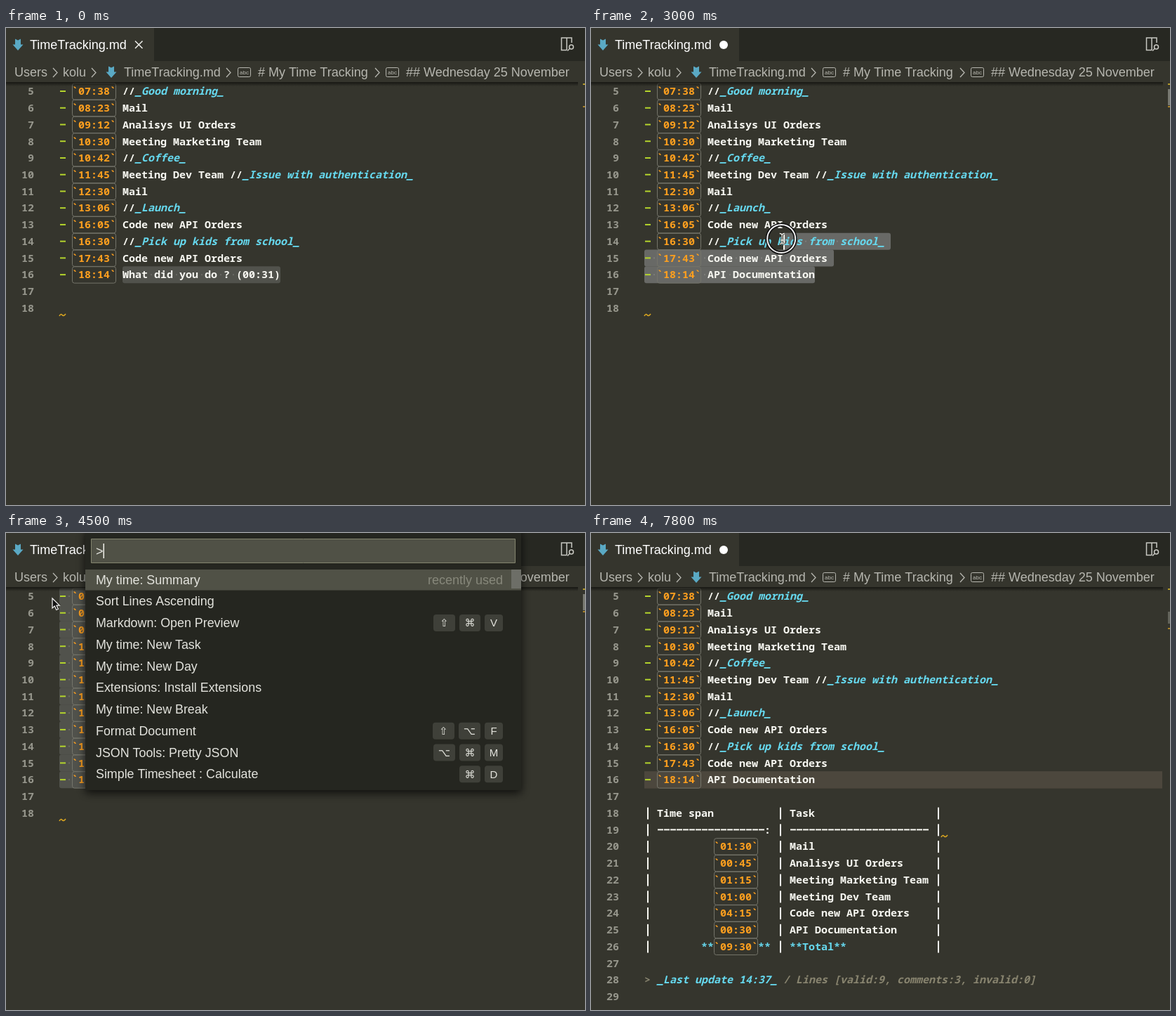
These frames come from a looping animation (825 px wide and 679 px high, 8 s). An HTML page with a canvas:

```html
<!DOCTYPE html>
<html lang="en">
<head>
<meta charset="utf-8">
<title>Time tracking</title>
<style>
  html, body { margin: 0; height: 100%; overflow: hidden; background: #35352d; }
  canvas { display: block; }
</style>
</head>
<body>
<canvas id="stage" width="825" height="679"></canvas>
<script>
const ctx = document.getElementById('stage').getContext('2d');
const LOOP = 8000, LEFT = 76, CHAR = 9, ROW = 23.74, FIRST = 5, LAST = 16;
const PASTE = 1400, MOUSE_IN = 2100, PRESS = 3000, RELEASE = 3700, PALETTE = 4500, DONE = 6300;
const BLINK_STARTS = [200, PASTE, PRESS, 3400, PALETTE, DONE];
const MOUSE = [[2100, 470, 300], [2500, 363, 345], [2900, 322, 351], [3400, 73, 96], [3500, 69, 95], [3700, 66, 93]];
const WHITE = '#f8f8f2', ORANGE = '#fd9f1f', CYAN = '#66d9ef', GREEN = '#b4d42c', GREY = '#88846f';
const UI = '"Liberation Sans", Arial, sans-serif';
const MONO = '"Noto Sans Mono", "Liberation Mono", monospace';

const ENTRIES = [
  ['07:38', '', 'Good morning'],
  ['08:23', 'Mail'],
  ['09:12', 'Analisys UI Orders'],
  ['10:30', 'Meeting Marketing Team'],
  ['10:42', '', 'Coffee'],
  ['11:45', 'Meeting Dev Team ', 'Issue with authentication'],
  ['12:30', 'Mail'],
  ['13:06', '', 'Launch'],
  ['16:05', 'Code new API Orders'],
  ['16:30', '', 'Pick up kids from school'],
  ['17:43', 'Code new API Orders'],
];
const TOTALS = [
  ['01:30', 'Mail'], ['00:45', 'Analisys UI Orders'], ['01:15', 'Meeting Marketing Team'],
  ['01:00', 'Meeting Dev Team'], ['04:15', 'Code new API Orders'], ['00:30', 'API Documentation'],
  ['09:30', '**Total**'],
];
const COMMANDS = [
  ['My time: Summary', ''], ['Sort Lines Ascending', ''], ['Markdown: Open Preview', '⇧⌘V'],
  ['My time: New Task', ''], ['My time: New Day', ''], ['Extensions: Install Extensions', ''],
  ['My time: New Break', ''], ['Format Document', '⇧⌥F'],
  ['JSON Tools: Pretty JSON', '⌥⌘M'], ['Simple Timesheet : Calculate', '⌘D'],
];

const rowY = row => 90 + (row - FIRST) * ROW;
const colX = col => LEFT + col * CHAR;

function rect(x, y, w, h, color) {
  ctx.fillStyle = color;
  ctx.fillRect(x, y, w, h);
}

function round(x, y, w, h, r, fill, stroke) {
  ctx.beginPath();
  ctx.roundRect(x, y, w, h, r);
  if (fill) { ctx.fillStyle = fill; ctx.fill(); }
  if (stroke) { ctx.strokeStyle = stroke; ctx.lineWidth = 1; ctx.stroke(); }
}

function line(d, color, width = 1.4) {
  ctx.strokeStyle = color;
  ctx.lineWidth = width;
  ctx.stroke(new Path2D(d));
}

function label(text, x, y, color, size = 18, align = 'left', family = UI) {
  ctx.font = `${size}px ${family}`;
  ctx.textAlign = align;
  ctx.fillStyle = color;
  ctx.fillText(text, x, y);
}

// Monospaced text on the editor grid
function code(text, col, row, color, style = '') {
  const y = rowY(row);
  ctx.font = `${style} bold 15px ${MONO}`;
  ctx.textAlign = 'center';
  ctx.fillStyle = color;
  [...text].forEach((ch, i) => {
    const x = colX(col + i);
    if (ch === '-') ctx.fillRect(x + 1, y - 1, 8, 2);
    else if (ch === '|') ctx.fillRect(x + 4, y - 8, 2, 17);
    else ctx.fillText(ch, x + CHAR / 2, y + 5.3);
  });
}

function timeBox(time, col, row) {
  round(colX(col) + 0.5, rowY(row) - 11.4, 62, 23.4, 3, null, '#74746a');
  code('`' + time + '`', col, row, ORANGE);
}

function squiggle(x, y) {
  line(`M${x} ${y + 2}q2 -4 4 -1.5t5 -1.5`, '#d9a520', 1.6);
}

function entries(t) {
  const last = t < PASTE ? 'What did you do ? (00:31)' : 'API Documentation';
  return [...ENTRIES, ['18:14', last]];
}

function plain([time, task, note]) {
  return '- `' + time + '` ' + task + (note ? `//_${note}_` : '');
}

function mouseAt(t) {
  const now = Math.floor(t / 100) * 100;
  const i = MOUSE.findIndex(key => key[0] > now);
  if (i < 0) return MOUSE.at(-1).slice(1);
  const [t0, x0, y0] = MOUSE[i - 1], [t1, x1, y1] = MOUSE[i];
  const k = (now - t0) / (t1 - t0);
  return [x0 + (x1 - x0) * k, y0 + (y1 - y0) * k];
}

function caretOn(t) {
  const start = BLINK_STARTS.findLast(s => s <= t);
  return start !== undefined && Math.floor((t - start) / 500) % 2 === 0;
}

// Where the selection or caret begins: [row, column]
function headAt(t, lines) {
  if (t < PASTE) return [LAST, 10];
  if (t < PRESS || t >= DONE) return [LAST, 27];
  const [x, y] = mouseAt(Math.min(t, 3400));
  const row = Math.max(FIRST, Math.min(LAST, Math.round((y - 90) / ROW) + FIRST));
  const length = lines[row - FIRST].length;
  return [row, Math.max(0, Math.min(length, Math.round((x - LEFT) / CHAR)))];
}

function selection(t, lines, [headRow, headCol]) {
  const inactive = t < 200 || t >= PALETTE;
  for (let row = headRow; row <= LAST; row++) {
    const text = lines[row - FIRST];
    const from = row === headRow ? headCol : 0;
    const to = text.length + (row < LAST ? 1 : 0);
    if (to <= from) continue;
    round(colX(from), rowY(row) - 11.9, (to - from) * CHAR, ROW + 0.2, 3, inactive ? '#51524c' : '#686966');
    for (let i = from; i < text.length; i++)
      if (text[i] === ' ') rect(colX(i) + 4, rowY(row) - 1, 2, 2, 'rgba(255,255,255,.13)');
  }
}

function summary(t) {
  const bars = row => [0, 21, 46].forEach(col => code('|', col, row, WHITE));
  for (let row = 18; row <= 26; row++) bars(row);
  code('Time span', 2, 18, WHITE);
  code('Task', 23, 18, WHITE);
  code('-'.repeat(17) + ':', 2, 19, WHITE);
  code('-'.repeat(22), 23, 19, WHITE);
  TOTALS.forEach(([time, task], i) => {
    timeBox(time, 11, 20 + i);
    code(task, 23, 20 + i, i === 6 ? CYAN : WHITE);
  });
  code('**', 9, 26, CYAN);
  code('**', 18, 26, CYAN);
  code('>', 0, 28, GREY);
  code('_Last update 14:37_', 2, 28, CYAN, 'italic');
  code('/ Lines [valid:9, comments:3, invalid:0]', 22, 28, GREY, 'italic');
  if (t >= 6800) squiggle(499, 431);
}

function editor(t) {
  const list = entries(t), lines = list.map(plain), head = headAt(t, lines);
  const selecting = t < PASTE || (t >= PRESS && t < DONE);
  if (selecting) selection(t, lines, head);
  else rect(LEFT, rowY(LAST) - 12, 738, 24.5, '#4c473d');

  const rows = t < DONE ? 18 : 30;
  for (let row = FIRST; row <= rows; row++) {
    const number = String(row);
    code(number, -4 - number.length, row, '#96968c');
  }
  list.forEach(([time, task, note], i) => {
    const row = FIRST + i;
    code('-', 0, row, GREEN);
    timeBox(time, 2, row);
    code(task, 10, row, WHITE);
    if (note) {
      code('//', 10 + task.length, row, WHITE);
      code(`_${note}_`, 12 + task.length, row, CYAN, 'italic');
    }
  });
  if (t < DONE) squiggle(76, 408);
  else summary(t);
  if (caretOn(t) && (t < PALETTE || t >= DONE))
    rect(colX(head[1]), rowY(head[0]) - 12, 2, 24, WHITE);

  // Overview ruler
  if (t >= PRESS && t < DONE) rect(822, 87, 3, 23, '#777870');
  if (t >= DONE) rect(822, 112, 3, 17, '#62635a');
  rect(822, 79, 3, 2, '#b59a2a');
  rect(822, t < DONE ? 111 : 135, 3, 2, '#a8822a');
}

function fileIcon(x, y) {
  ctx.fillStyle = '#5aa9c4';
  ctx.fill(new Path2D(`M${x - 4} ${y - 8}l4 2l4 -2v8h3.5l-7.5 8.5l-7.5 -8.5h3.5z`));
}

function header(t) {
  rect(0, 0, 825, 47, '#272822');
  rect(0, 0, 211, 47, '#35352d');
  rect(0, 47, 825, 31, '#35352d');
  const shade = ctx.createLinearGradient(0, 77, 0, 83);
  shade.addColorStop(0, 'rgba(20,20,16,.9)');
  shade.addColorStop(1, 'rgba(20,20,16,0)');
  rect(0, 77, 815, 6, shade);

  fileIcon(17, 23.5);
  label('TimeTracking.md', 34, 30, '#ffffff');
  if (t < PASTE) line('M184 18.5l10.5 10.5m0 -10.5l-10.5 10.5', '#eeeeea', 1.5);
  else round(183, 18, 12, 12, 6, '#ffffff');
  line('M799 31.5H791.5V14H806V21M799 14V31.5M803 29.5l-3 3', '#c8c8c2', 1.5);
  line('M808.5 27a3 3 0 1 1 -6 0a3 3 0 1 1 6 0', '#c8c8c2', 1.5);

  const dim = '#b6b6af';
  [['Users', 12], ['kolu', 81], ['TimeTracking.md', 168], ['# My Time Tracking', 359], ['## Wednesday 25 November', 570]]
    .forEach(([text, x]) => label(text, x, 69, dim));
  [67, 122, 314, 526].forEach(x => line(`M${x} 57l6 6.5l-6 6.5`, dim, 1.3));
  fileIcon(150, 62.5);
  [330, 541].forEach(x => {
    round(x + 0.5, 56.5, 18, 13, 2, null, dim);
    label('abc', x + 9.5, 65.5, dim, 8, 'center');
  });
}

function palette(t) {
  ctx.save();
  ctx.shadowColor = 'rgba(0,0,0,.75)';
  ctx.shadowBlur = 12;
  ctx.shadowOffsetY = 4;
  rect(113, -6, 621, 372, '#252620');
  ctx.restore();
  round(121.5, 8.5, 604, 34, 0, '#505146', '#84856f');
  label('>', 128, 32, '#e4e4de');
  if (caretOn(t)) rect(138.5, 15, 1.5, 21, '#f0f0ea');
  rect(113, 52, 621, 29.5, '#505146');
  rect(720, 52, 14, 27, '#6d6e67');
  label('recently used', 708, 72.5, '#87887b', 18, 'right');
  COMMANDS.forEach(([name, keys], i) => {
    const y = 66.4 + i * 30.75;
    label(name, 128, y + 6.2, '#e3e3dd', 17.85);
    let right = 708;
    [...keys].reverse().forEach(key => {
      const width = key === '⌘' ? 30 : /[A-Z]/.test(key) ? 26 : 31;
      round(right - width, y - 12, width, 24, 4, '#3f4039');
      label(key, right - width / 2, y + 5.5, '#e3e3dd', 15, 'center', UI.replace(', sans', ', "DejaVu Sans", sans'));
      right -= width + 6;
    });
  });
}

function pointer(t) {
  const [x, y] = mouseAt(t);
  if (t >= PRESS && t < RELEASE) {
    ctx.beginPath();
    ctx.arc(x - 1, y, 20, 0, 7);
    ctx.strokeStyle = '#111111';
    ctx.lineWidth = 5;
    ctx.stroke();
    ctx.strokeStyle = '#f2f2f2';
    ctx.lineWidth = 2;
    ctx.stroke();
  }
  if (x > LEFT) {
    const beam = `M${x - 3.5} ${y - 7.5}q3.5 0 3.5 3v9q0 3 -3.5 3M${x + 3.5} ${y - 7.5}q-3.5 0 -3.5 3v9q0 3 3.5 3M${x - 2} ${y + 2}h4`;
    line(beam, '#22221c', 3);
    line(beam, '#f0f0ea', 1.3);
  } else {
    const arrow = `M${x} ${y}v14l3.3 -3l2.5 5.5l2.6 -1.2l-2.4 -5.2h4.3z`;
    ctx.fillStyle = '#111111';
    ctx.fill(new Path2D(arrow));
    line(arrow, '#f2f2f2', 1.2);
  }
}

function draw() {
  const t = performance.now() % LOOP;
  rect(0, 0, 825, 679, '#35352d');
  editor(t);
  header(t);
  if (t >= PALETTE && t < DONE) palette(t);
  if (t >= MOUSE_IN && t < DONE) pointer(t);
  requestAnimationFrame(draw);
}
draw();
</script>
</body>
</html>
```
